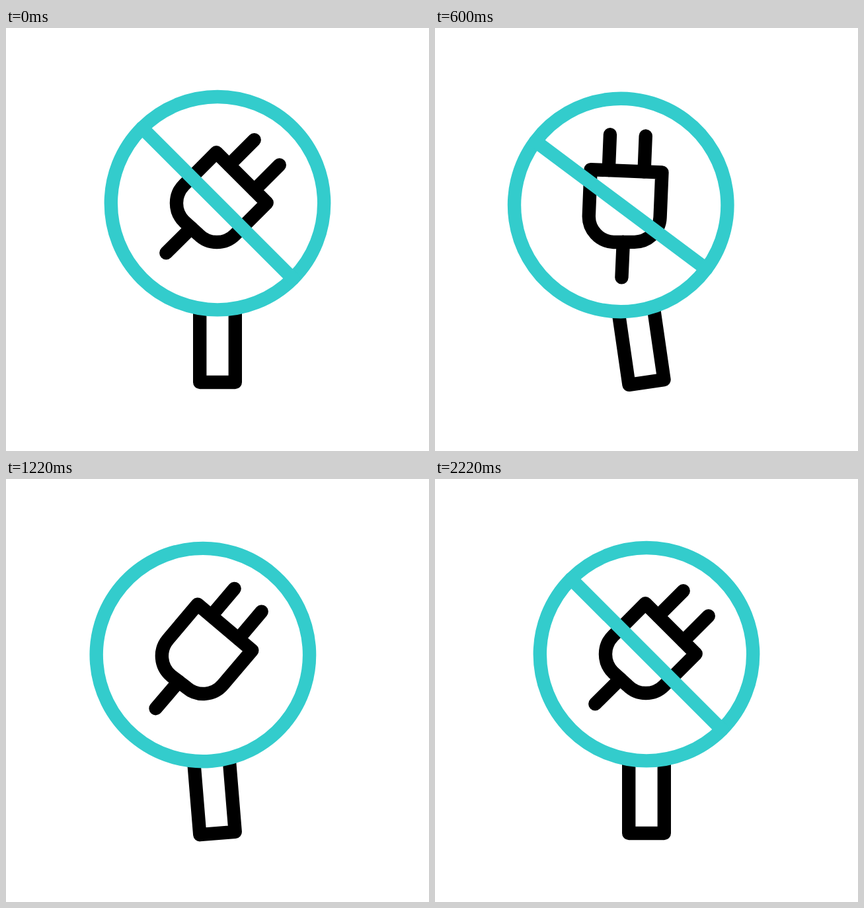
Recreate the animation shown at these times as an HTML page. Size 640 by 640 pixels, loop 2820 ms.

```html
<!DOCTYPE html>
<html lang="en">
<head>
<meta charset="utf-8">
<title>No plug sign</title>
<style>
  html, body { margin: 0; height: 100%; overflow: hidden; background: #fff; }
  svg { display: block; width: 100vw; height: 100vh; }
  g { fill: none; stroke: #000; stroke-width: 20.4; stroke-linecap: round; stroke-linejoin: round; }
  .teal { stroke: #3cc; }
</style>
</head>
<body>
<svg viewBox="0 0 640 640">
  <g id="sign">
    <path d="M293.2 428V536H346.8V428"/>
    <g id="plug">
      <path d="M318.3 188.3L394.7 264.5L346.6 312.6A39 39 0 0 1 291.4 312.6L269.4 292.6A39 39 0 0 1 269.4 237.4Z"/>
      <path d="M242.3 340.2L280.3 302.4M375.7 169.2L337.7 207.3M413.8 207.2L375.7 245.4"/>
    </g>
    <g class="teal">
      <circle cx="320" cy="265.2" r="161.2"/>
      <path id="bar"/>
    </g>
  </g>
</svg>
<script>
const LOOP = 2820;
const [sign, plug, bar] = ['sign', 'plug', 'bar'].map(id => document.getElementById(id));

// [time in ms, degrees]
const signSwing = [[0, 0], [405, -14.1], [930, 8.3], [1310, -5.9], [1695, 2.5], [1890, -0.85], [2090, 0]];
const plugSwing = [[0, 0], [400, 10.7], [800, -78.5], [1200, 0]];

const clamp = u => Math.min(1, Math.max(0, u));
const progress = (t, from, to) => clamp((t - from) / (to - from));
const ease = u => u * u / (u * u + (1 - u) * (1 - u));

function swing(keys, t) {
  let angle = keys[0][1];
  for (let i = 1; i < keys.length; i++) {
    const [from, a] = keys[i - 1], [to, b] = keys[i];
    angle += (b - a) * ease(progress(t, from, to));
  }
  return angle;
}

function draw(t) {
  sign.setAttribute('transform', `rotate(${swing(signSwing, t)} 320 536)`);
  plug.setAttribute('transform', `rotate(${swing(plugSwing, t)} 328 254.6)`);

  // The bar wipes out toward the lower right, then grows back from the upper left.
  const start = t < 1400 ? progress(t, 675, 1155) : 0;
  const end = t < 1400 ? 1 : progress(t, 1740, 2220);
  const point = u => `${206 + 228 * u} ${151.2 + 228 * u}`;
  bar.setAttribute('d', `M${point(start)}L${point(end)}`);
}

function tick() {
  draw(performance.now() % LOOP);
  requestAnimationFrame(tick);
}
tick();
</script>
</body>
</html>
```
